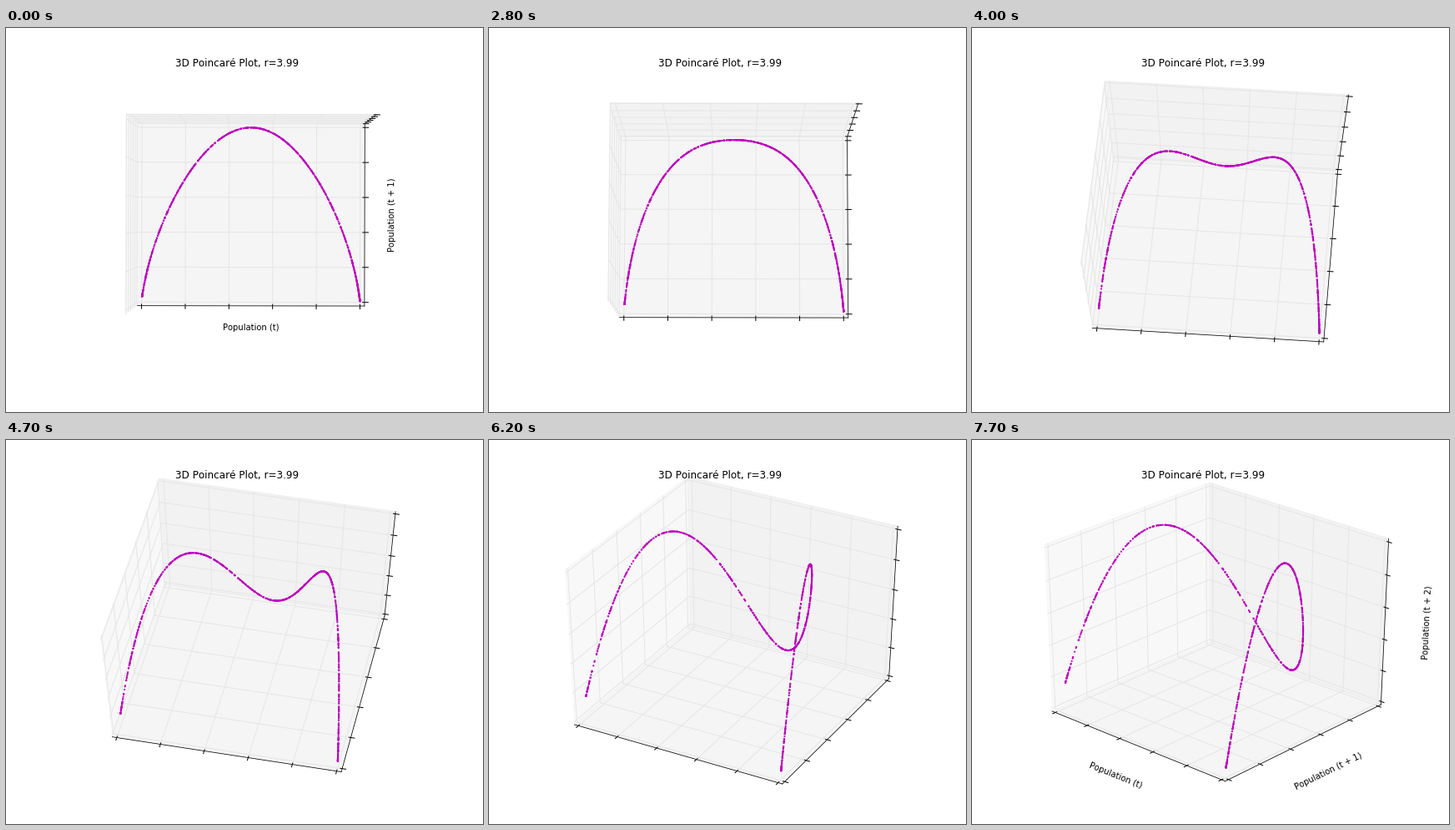
Write a matplotlib script that moves like this. It is 572x460 px and loops after 10 s.

```python
import math

import matplotlib.pyplot as plt
import numpy as np
from matplotlib.animation import FuncAnimation
from matplotlib.collections import LineCollection
from matplotlib.patches import Polygon

plt.rcParams.update({
    "font.family": "DejaVu Sans",
    "text.kerning_factor": 6,
    "toolbar": "None",
})

W, H, DPI = 572, 460, 72
FRAMES, INTERVAL = 100, 100

# Camera: start pose, then (first, last + 1, tilt, turn) in degrees per frame
ELEV, AZIM, DIST = 89.9, 270.1, 11.0
MOVES = [
    (20, 23, 0.5, 0.0),
    (23, 37, 1.0, 0.0),
    (37, 61, 1.5, 1.1),
    (61, 65, 1.0, 1.1),
    (65, 74, 0.5, 1.1),
    (74, 77, 0.2, 0.5),
]

# Projection scale and screen centre in pixels
SCALE = np.array([558.0, 446.4]) / 0.185
CENTRE = np.array([7.2, 7.2]) + 0.095 * SCALE

# Unit cube with a small margin; BACK is the corner where the panes meet
DELTA = 1 / 12
LOW, HIGH = -DELTA / 4, 1 + DELTA / 4
BACK = np.array([LOW, HIGH, LOW])
TICKS = np.linspace(0, 1, 6)
LABEL_GAP = 1.6 * DELTA

PANES = [  # axis, corner walk over the other two axes, grey level
    (0, [(LOW, LOW), (HIGH, LOW), (HIGH, HIGH), (LOW, HIGH)], 0.95),
    (1, [(LOW, LOW), (HIGH, LOW), (HIGH, HIGH), (LOW, HIGH)], 0.90),
    (2, [(LOW, LOW), (HIGH, LOW), (HIGH, HIGH), (LOW, HIGH)], 0.925),
]
TICK_AXIS = (1, 0, 0)      # direction in which each axis' ticks point
EDGE_FLIP = (1, 0, 0)      # coordinate flipped to reach each drawn edge
NAMES = ("Population (t)", "Population (t + 1)", "Population (t + 2)")


def logistic(count, rate=3.99, pop=0.5):
    pops = [pop]
    for _ in range(count - 1):
        pop = pop * rate * (1 - pop)
        pops.append(pop)
    return np.array(pops)


def flip(value):
    return HIGH if value == LOW else LOW


def with_value(point, axis, value):
    out = np.array(point, float)
    out[axis] = value
    return out


def camera(n):
    elev, azim = ELEV, AZIM
    for start, stop, tilt, turn in MOVES:
        k = min(max(n - start + 1, 0), stop - start)
        elev -= k * tilt
        azim += k * turn
    return math.radians(elev), math.radians(azim)


def project(points, elev, azim):
    ce, se, ca, sa = math.cos(elev), math.sin(elev), math.cos(azim), math.sin(azim)
    rel = np.asarray(points, float) - 0.5
    right = rel @ (-sa, ca, 0)
    up = rel @ (-se * ca, -se * sa, ce)
    depth = DIST - rel @ (ce * ca, ce * sa, se)
    flat = np.stack([right / depth, up / depth], axis=-1)
    return CENTRE + flat * SCALE


def pane_points(axis, walk):
    return [np.insert(np.array(c), axis, BACK[axis]) for c in walk]


def edge_points(axis):
    a = with_value(BACK, EDGE_FLIP[axis], flip(BACK[EDGE_FLIP[axis]]))
    return np.array([a, with_value(a, axis, flip(a[axis]))])


def grid_points(axis):
    lines = []
    for t in TICKS:
        mid = with_value(BACK, axis, t)
        ends = [with_value(mid, k % 3, flip(mid[k % 3])) for k in (axis + 1, axis + 2)]
        lines.append([ends[0], mid, ends[1]])
    return np.array(lines)


def tick_points(axis):
    base, d = edge_points(axis)[0], TICK_AXIS[axis]
    sign = 1 if BACK[d] == HIGH else -1
    lines = []
    for t in TICKS:
        p = with_value(base, axis, t)
        lines.append([with_value(p, d, p[d] + f * sign * DELTA) for f in (0.1, -0.2)])
    return np.array(lines)


def label_point(axis):
    mid = edge_points(axis).mean(axis=0)
    shift = np.sign(mid - 0.5) * LABEL_GAP
    shift[axis] = 0
    return mid + shift


fig = plt.figure(figsize=(W / DPI, H / DPI), dpi=DPI, facecolor="white")
ax = fig.add_axes([0, 0, 1, 1])
ax.set(xlim=(0, W), ylim=(0, H))
ax.axis("off")

panes = []
for axis, walk, grey in PANES:
    patch = Polygon(np.zeros((4, 2)), closed=False, lw=1, alpha=0.5,
                    fc=(grey,) * 3, ec=(grey,) * 3, zorder=1)
    ax.add_patch(patch)
    panes.append((patch, pane_points(axis, walk)))

edges, segments, labels = [], [], []
for axis in range(3):
    z = 2 + axis
    line, = ax.plot([], [], color="black", lw=0.75, zorder=z)
    edges.append((line, edge_points(axis)))
    grid = LineCollection([], colors="0.9", linewidths=1, zorder=z + 0.1)
    ticks = LineCollection([], colors="black", linewidths=1,
                           capstyle="projecting", zorder=z + 0.2)
    for coll, pts in ((grid, grid_points(axis)), (ticks, tick_points(axis))):
        ax.add_collection(coll, autolim=False)
        segments.append((coll, pts))
    labels.append(ax.text(0, 0, NAMES[axis], size=10, ha="center", va="center", zorder=9))

pops = logistic(1000)
cloud = np.column_stack([pops[:-2], pops[1:-1], pops[2:]])
dots = ax.scatter(*np.zeros((2, len(cloud))), s=np.full(len(cloud), 5.0), marker=".",
                  c="#bf00bf", linewidths=1, zorder=8)
ax.set(xlim=(0, W), ylim=(0, H))
ax.text(277.5, 414, "3D Poincaré Plot, r=3.99", size=12, ha="center", va="baseline", zorder=9)


def draw(n):
    view = camera(n)
    for patch, pts in panes:
        patch.set_xy(project(pts, *view))
    for coll, pts in segments:
        coll.set_segments(list(project(pts, *view)))
    for axis, (line, pts) in enumerate(edges):
        ends = project(pts, *view)
        line.set_data(*ends.T)
        dx, dy = ends[1] - ends[0]
        angle = math.degrees(math.atan2(dy, dx)) % 180
        label = labels[axis]
        label.set_rotation(angle - 180 if angle > 90 else angle)
        label.set_position(project(label_point(axis), *view))
        label.set_visible(n >= 77 or (n < 20 and axis < 2))
    dots.set_offsets(project(cloud, *view))
    return []


anim = FuncAnimation(fig, draw, frames=FRAMES, interval=INTERVAL,
                     init_func=lambda: draw(0), repeat=True, repeat_delay=0, blit=False)
plt.show()
```
